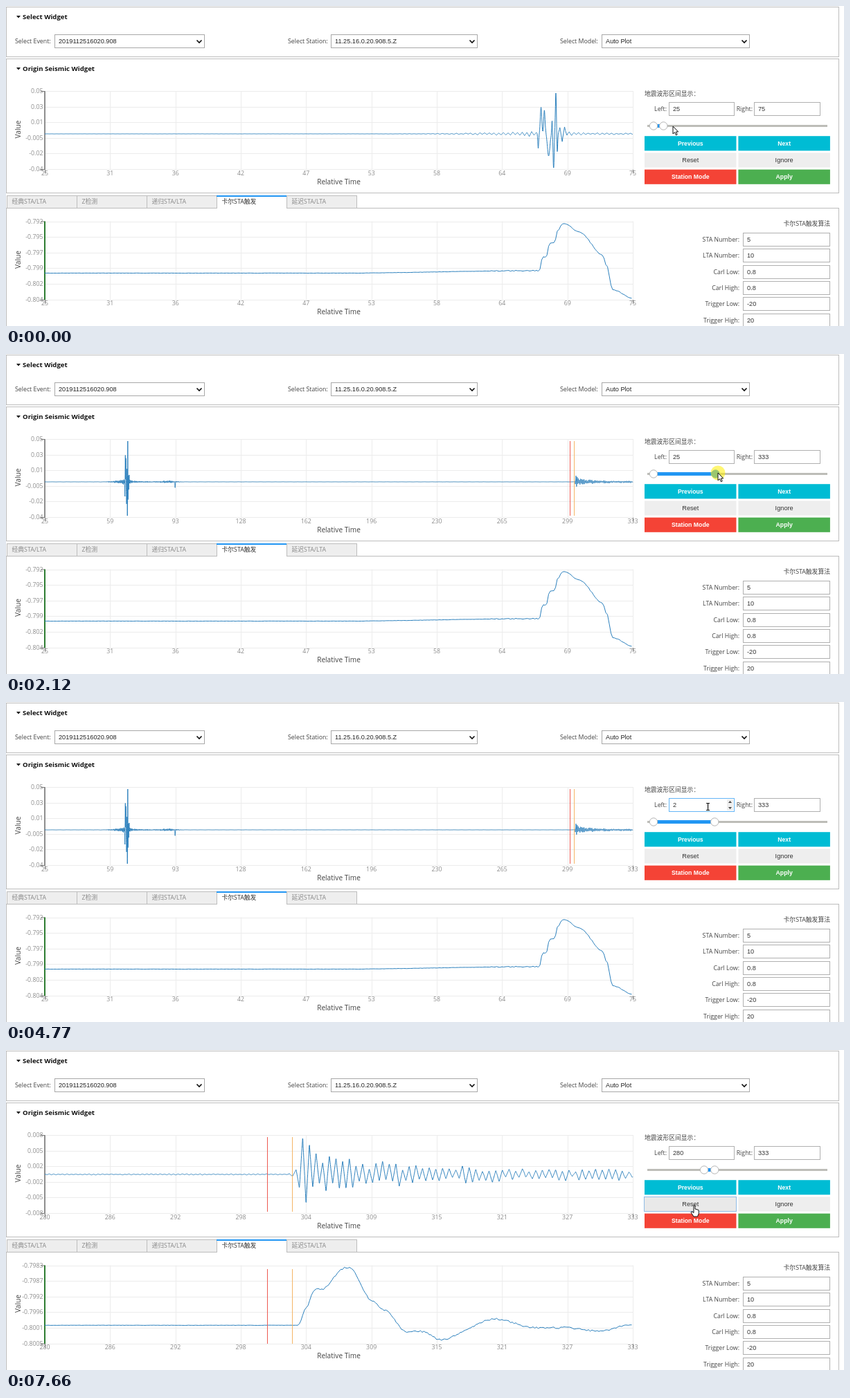
Write an HTML page with a canvas that moves like this. It is 1210x463 px and loops after 8 s.

```html
<!DOCTYPE html>
<html lang="en">
<head>
<meta charset="utf-8">
<title>Seismic widgets</title>
<style>
  html, body { margin: 0; width: 100%; height: 100%; overflow: hidden; background: #fff; }
  canvas { display: block; }
</style>
</head>
<body>
<canvas id="stage" width="1210" height="463"></canvas>
<script>
const ctx = document.getElementById('stage').getContext('2d');
const LOOP = 8000;
const UI = '"Open Sans", "Noto Sans CJK SC", "Noto Sans CJK", sans-serif';
const FIELD = '"Liberation Sans", Arial, sans-serif';
const BLUE = '#2196f3', LINE = '#2b80bd', BORDER = '#bdbdbd';
const PLOT = { x: 56, w: 849, h: 113 };

const lerp = (a, b, p) => a + (b - a) * p;
const clamp = (v, lo, hi) => Math.min(hi, Math.max(lo, v));
const bump = (v, center, width) => Math.exp(-(((v - center) / width) ** 2));
const ease = (v, from, to) => {
  const p = clamp((v - from) / (to - from), 0, 1);
  return p * p * (3 - 2 * p);
};
const random = k => {
  const v = Math.sin(k * 127.1 + 11.7) * 43758.5453;
  return v - Math.floor(v);
};

// Straight lines between alternating peaks whose height comes from peak(k).
function zigzag(u, peak) {
  const k = Math.floor(u);
  const value = i => (i % 2 ? -1 : 1) * peak(i);
  return lerp(value(k), value(k + 1), u - k);
}

// First shock as pulses: [second, width, height].
const PULSES = [[66.96, .05, -20], [67.2, .09, 37], [67.48, .08, 34], [67.85, .15, -31],
  [68.14, .05, 22], [68.27, .06, -52], [68.46, .06, 59], [68.58, .05, -25], [93.25, .12, -9]];

// Ground motion in pixels at the coarse vertical scale.
function signal(s) {
  const level = .14 + 1.9 * bump(s, 66, 7) + 2.5 * bump(s, 67.5, 2.5) + 8 * bump(s, 69, .5)
    + 1.6 * bump(s, 90, 5) + .6 * bump(s, 78, 8);
  let v = level * zigzag(s / .2, k => .25 + .75 * random(k));
  for (const [center, width, height] of PULSES) v += height * bump(s, center, width);
  if (s > 302) {
    v += zigzag((s - 303.25) / .3, k => k < 0 ? 9 * Math.exp(k)
      : 9 * bump(k, 0, 2.2) + (k > 1 ? (1.2 + 4.2 * Math.exp(-k / 35)) * (.3 + .7 * random(k)) : 0));
  }
  return clamp(v, -49, 59);
}
const RATE = 50, FIRST = 25;
const WAVE = Array.from({ length: 335 * RATE }, (_, i) => signal(FIRST + i / RATE));

// Detector curves as eased level changes: [from x, to x, change].
const DETECTOR = {
  before: { base: 386.5, rough: .7, from: 700, steps: [[480, 765, -3.5], [770, 775, -20], [780, 785, -20],
    [792, 796, -18], [796, 804, -9.5], [806, 830, 12], [828, 862, 33], [862, 866, 14], [867, 876, 36], [876, 905, 12]] },
  after: { base: 398.3, rough: 1.3, from: 422, steps: [[422, 434, -26], [433, 446, -26], [455, 490, -31],
    [496, 530, 49], [530, 546, 12], [546, 578, 31], [600, 628, 12], [626, 706, -30], [706, 764, 12.5],
    [810, 855, 5], [855, 905, -10]] },
};

// Hand movement: [time, pointer x, pointer y, right limit].
const MOTION = [[0, 963, 174, 75], [145, 953, 174, 75], [385, 953, 174, 75], [778, 956, 174, 78],
  [1409, 977, 172, 139], [2118, 1028, 172, 333], [2433, 1032, 172, 351], [2827, 1032, 172, 351],
  [3300, 1028, 172, 335], [3615, 1015, 153, 333], [6680, 1011, 149, 333], [7080, 994, 225, 333]];

function motionAt(t) {
  const i = MOTION.findIndex(key => key[0] >= t);
  if (i < 0) return MOTION[MOTION.length - 1];
  const b = MOTION[i], a = MOTION[Math.max(0, i - 1)];
  const p = i ? (t - a[0]) / (b[0] - a[0]) : 0;
  return a.map((v, n) => lerp(v, b[n], p));
}

function text(str, x, y, { size = 8.8, color = '#444', align = 'left', bold = false, face = UI } = {}) {
  ctx.font = `${bold ? 'bold ' : ''}${size}px ${face}`;
  ctx.fillStyle = color;
  ctx.textAlign = align;
  ctx.fillText(str, x, y);
}
function fill(x, y, w, h, color) {
  ctx.fillStyle = color;
  ctx.fillRect(x, y, w, h);
}
function box(x, y, w, h, color = BORDER) {
  ctx.strokeStyle = color;
  ctx.lineWidth = 1;
  ctx.strokeRect(x + .5, y + .5, w - 1, h - 1);
}
function path(points, { stroke, paint, width = 1, close = false }) {
  ctx.beginPath();
  points.forEach(([x, y]) => ctx.lineTo(x, y));
  if (close) ctx.closePath();
  if (paint) { ctx.fillStyle = paint; ctx.fill(); }
  if (stroke) { ctx.strokeStyle = stroke; ctx.lineWidth = width; ctx.stroke(); }
}
function disc(x, y, r, paint, stroke) {
  ctx.beginPath();
  ctx.arc(x, y, r, 0, Math.PI * 2);
  ctx.fillStyle = paint;
  ctx.fill();
  if (stroke) { ctx.strokeStyle = stroke; ctx.lineWidth = 1; ctx.stroke(); }
}
function field(value, x, y, w, color = '#b0b0b0') {
  box(x, y, w, 20, color);
  text(value, x + 6, y + 13, { size: 9.2, color: '#333', face: FIELD });
}

function heading(str, y) {
  path([[15, y - 5], [21, y - 5], [18, y - 1.5]], { paint: '#111', close: true });
  text(str, 24, y, { size: 9.6, color: '#111', bold: true });
}
function dropdown(label, value, labelX, x, w) {
  text(label, labelX, 54);
  box(x, 41, w, 20, '#a8a8a8');
  text(value, x + 6, 54.3, { size: 9.2, color: '#222', face: FIELD });
  const c = x + w - 8;
  path([[c - 3.5, 49.5], [c, 53], [c + 3.5, 49.5]], { stroke: '#111', width: 1.7 });
}
function button(label, col, row, color, plain) {
  const x = 922 + col * 135.4, y = 188.2 + row * 24.2, w = 132.5;
  fill(x, y, w, 21.2, color);
  text(label, x + w / 2, y + 13.5, {
    size: plain ? 9.2 : 8.7, align: 'center', bold: !plain, color: plain ? '#333' : '#fff', face: FIELD });
}

function axes(top, left, right, labels, domain, width) {
  const tick = { color: '#8c8c8c' };
  for (let i = 0; i < 10; i++) {
    const x = PLOT.x + PLOT.w * i / 9;
    fill(Math.round(x), top, 1, PLOT.h, '#ececec');
    text(Math.round(lerp(left, right, i / 9)), x, top + PLOT.h + 8.5, { ...tick, align: 'center' });
  }
  labels.forEach((label, i) => {
    const y = top + PLOT.h * i / 5;
    fill(PLOT.x, Math.round(y), PLOT.w, 1, '#ececec');
    text(label, 53.5, y + 3, { ...tick, align: 'right' });
  });
  const bottom = top + PLOT.h + .5;
  path([[50, top + .5], [56, top + .5], [56, bottom], [50, bottom]], { stroke: '#777' });
  path([[56, top], [56, bottom]], { stroke: domain, width });
  for (const x of [56.5, 905.5]) path([[x, bottom], [x, bottom + 6]], { stroke: '#888' });
  text('Relative Time', 480.5, bottom + 21, { size: 10.1, align: 'center' });
  ctx.save();
  ctx.translate(20.5, top + PLOT.h / 2 - 1);
  ctx.rotate(-Math.PI / 2);
  text('Value', 0, 0, { size: 10.2, align: 'center' });
  ctx.restore();
}
function marker(s, left, right, color, top, bottom) {
  if (s < left || s > right) return;
  const x = Math.round(PLOT.x + PLOT.w * (s - left) / (right - left)) + .5;
  path([[x, top], [x, bottom]], { stroke: color });
}
function markers(left, right, top, bottom, inset = 0) {
  marker(300.02, left, right, '#ee5a52', top + inset, bottom - inset * .8);
  marker(302.28, left, right, '#f5b566', top, bottom);
}

function seismogram(left, right, zoomed, settling) {
  axes(123, left, right, zoomed
    ? ['0.008', '0.005', '0.002', '-0.002', '-0.005', '-0.008']
    : ['0.05', '0.03', '0.01', '-0.005', '-0.02', '-0.04'], '#666', 1);
  const base = zoomed ? 180 : 185, gain = zoomed ? 6 : 1;
  const start = (left - FIRST) * RATE, count = (right - left) * RATE;
  const points = Array.from({ length: count + 1 }, (_, i) =>
    [PLOT.x + PLOT.w * i / count, base - gain * WAVE[start + i]]);
  path(points, { stroke: LINE });
  markers(left, right, 126, 234, settling ? 50 : 0);
}
function detector(updated) {
  axes(311.5, updated ? 280 : 25, updated ? 333 : 75, updated
    ? ['-0.7983', '-0.7987', '-0.7992', '-0.7996', '-0.8001', '-0.8005']
    : ['-0.792', '-0.795', '-0.797', '-0.799', '-0.802', '-0.804'], '#2e7d32', 2);
  const { base, rough, from, steps } = updated ? DETECTOR.after : DETECTOR.before;
  const points = [];
  for (let x = 56; x <= 905; x += 2.5) {
    const level = steps.reduce((y, [a, b, change]) => y + change * ease(x, a, b), base);
    points.push([x, level + (x > from ? rough : .2) * (random(x) * 2 - 1)]);
  }
  path(points, { stroke: LINE });
  if (updated) markers(280, 333, 317, 425);
}

function panels() {
  fill(0, 0, 1210, 463, '#fff');
  box(0, 1, 1203, 73);
  box(0, 76, 1203, 195);
  box(0, 292, 1203, 180);
  heading('Select Widget', 19);
  heading('Origin Seismic Widget', 94);
  dropdown('Select Event:', '2019112516020.908', 13, 70, 217);
  dropdown('Select Station:', '11.25.16.0.20.908.5.Z', 407, 469, 212);
  dropdown('Select Model:', 'Auto Plot', 800, 860, 214);

  ['经典STA/LTA', 'Z检测', '递归STA/LTA', '卡尔STA触发', '延迟STA/LTA'].forEach((label, i) => {
    const x = 1 + i * 101, active = i === 3;
    fill(x, 274, 102, 18, active ? '#fff' : '#eee');
    box(x, 274, 102, 19);
    if (active) {
      fill(x + 1, 290, 100, 4, '#fff');
      fill(x, 274, 102, 2, BLUE);
    }
    text(label, x + 7.5, 286, { color: active ? '#333' : '#8a8a8a' });
  });

  text('卡尔STA触发算法', 1190, 318, { align: 'right' });
  [['STA Number:', 5], ['LTA Number:', 10], ['Carl Low:', 0.8], ['Carl High:', 0.8],
   ['Trigger Low:', -20], ['Trigger High:', 20]].forEach(([label, value], i) => {
    const y = Math.round(328 + i * 23.3);
    text(label, 1059, y + 13, { align: 'right' });
    field(String(value), 1064, y, 126);
  });
}

function leftInput(t) {
  const focused = t >= 3840 && t < 7360;
  const typed = t < 4770 ? '25' : t < 5310 ? '2' : t < 5380 ? '28' : '280';
  text('Left:', 954, 152, { align: 'right' });
  field(typed, 957, 139, 95, focused ? '#64b5f6' : '#b0b0b0');
  const caret = t < 4460 || (t >= 4930 && t < 5940) || t >= 6480;
  if (focused && caret) fill(Math.round(963 + ctx.measureText(typed).width), 143, 1, 11, '#222');
  if (t >= 3615 && t < 7360) {
    fill(1041, 141, 9, 16, '#eee');
    for (const dir of [-1, 1]) {
      const y = 149 + dir * 3;
      path([[1043, y], [1048, y], [1045.5, y + dir * 3]], { paint: '#444', close: true });
    }
  }
}
function slider(t, left, right, pointerX, dragging) {
  const place = v => 935 + (v - 25) * .2865;
  const low = place(left), high = dragging ? pointerX - 3.5 : place(right);
  const lit = t >= 145 && t < 3840;
  fill(926, 172, 260, 3, '#bdbdb8');
  fill(low, 171, high - low, 5, BLUE);
  disc(low, 173.5, 5.7, '#fff', '#b5b5b5');
  disc(high, 173.5, 5.7, lit ? BLUE : '#fff', lit ? BLUE : '#b5b5b5');
}
function controls(t, left, right, pointerX, dragging) {
  text('地震波形区间显示：', 922, 129.5);
  leftInput(t);
  text('Right:', 1078, 152, { align: 'right' });
  field(String(right), 1080, 139, 96);
  slider(t, left, right, pointerX, dragging);
  button('Previous', 0, 0, '#00bcd4');
  button('Next', 1, 0, '#00bcd4');
  button('Reset', 0, 1, t >= 7080 ? '#e9e9e9' : '#eee', true);
  button('Ignore', 1, 1, '#eee', true);
  button('Station Mode', 0, 2, '#f44336');
  button('Apply', 1, 2, '#4caf50');
  if (t >= 7360) box(921, 212, 134, 22, '#8fbce6');
}

function pointer(x, y, t, pressed) {
  if (pressed) disc(x, y, 10.5, 'rgba(255, 238, 0, .55)');
  ctx.save();
  ctx.translate(x, y);
  const outline = { paint: '#fff', stroke: '#111', close: true };
  if (t >= 3615 && y < 159) {
    for (const end of [-5, 5]) path([[-2.5, end], [2.5, end]], { stroke: '#111' });
    path([[0, -5], [0, 5]], { stroke: '#111', width: 1.2 });
  } else if (y > 188) {
    path([[-1, 0], [1, 0], [1, 5], [6, 6.5], [6.5, 11], [4.5, 16], [-1, 16], [-5, 10], [-4, 8.5], [-1, 10.5]], outline);
  } else {
    path([[0, 0], [0, 11], [2.6, 8.7], [4.4, 12.8], [6.2, 12], [4.4, 8], [7.7, 8]], outline);
  }
  ctx.restore();
}

function render(t) {
  const step = 78.8;
  const tick = 700 + Math.floor((t - 700) / step) * step;
  const [, x, y, limit] = motionAt(tick);
  const left = t < 5720 ? 25 : 280;
  const right = Math.round(limit);
  const dragging = tick >= 380 && tick < 3350;

  panels();
  seismogram(left, right, t >= 5790, t >= 5720 && t < 5790);
  detector(t >= 7660);
  controls(t, left, right, x, dragging);
  pointer(x, y, t, dragging || (t >= 3840 && t < 3930));
}

const start = performance.now();
function loop() {
  render((performance.now() - start) % LOOP);
  requestAnimationFrame(loop);
}
loop();
</script>
</body>
</html>
```
